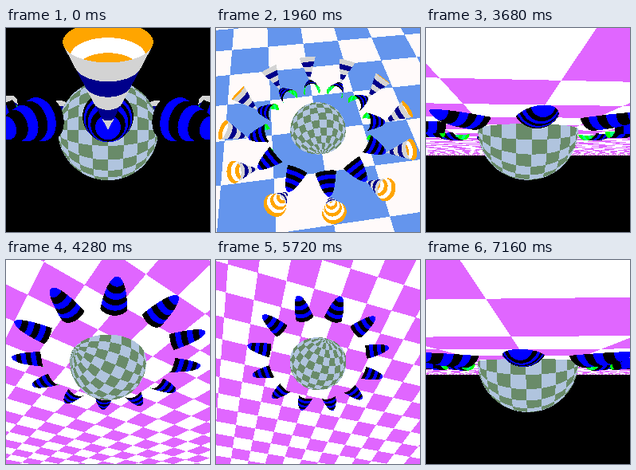
Write an HTML page with a canvas that moves like this. It is 256 px wide and 256 px high and loops after 7.2 s.

```html
<!DOCTYPE html>
<html lang="en">
<head>
<meta charset="utf-8">
<title>Orbit around a checkered sphere</title>
<style>
  html, body { margin: 0; width: 100%; height: 100%; overflow: hidden; background: #000; }
  canvas { display: block; width: 100vw; height: 100vh; image-rendering: pixelated; }
</style>
</head>
<body>
<canvas id="stage" width="256" height="256"></canvas>
<script>
const SIZE = 256, HALF = SIZE / 2, STEPS = 180, STEP_MS = 40;
const FOCAL = HALF / Math.tan(Math.PI / 8);
const ORBIT = 5, LIFT = 7.5;
const RAD = Math.PI / 180;

const ctx = document.getElementById('stage').getContext('2d');
const image = ctx.createImageData(SIZE, SIZE);
const pixels = new Uint32Array(image.data.buffer);
const depth = new Float64Array(SIZE * SIZE);

const rgb = hex => (255 << 24 | (hex & 255) << 16 | (hex >> 8 & 255) << 8 | hex >> 16) >>> 0;
const pair = (a, b) => [rgb(a), rgb(b)];
const skin = (bands, a, b) => ({ bands, colors: pair(a, b) });
const dot = (a, b) => a[0] * b[0] + a[1] * b[1] + a[2] * b[2];

const BLACK = rgb(0x000000);
const FLOOR_TOP = { size: 5 / 3, colors: pair(0x6495ed, 0xfffafa) };
const FLOOR_UNDER = { size: 5 / 6, colors: pair(0xe066ff, 0xffffff) };
const BALL = pair(0x698b69, 0xb0c4de);

// Surface of revolution: radius² = a k² + b k for 0 <= k <= length along its axis.
const CONE = { length: 0.95, radius: 0.333, a: (0.333 / 0.95) ** 2, b: 0, tilt: 45,
  outside: skin(5, 0xd3d3d3, 0x00008b), inside: skin(8, 0xffa500, 0xffffff) };
const CUP = { length: 0.75, radius: 0.333, a: 0, b: 0.333 ** 2 / 0.75, tilt: 167,
  outside: skin(6, 0x000000, 0x0000ff), inside: skin(8, 0x00ff00, 0x00ff7f) };

const solids = [];
for (let i = 0; i < 12; i++) {
  const s = Math.sin(i * 30 * RAD), c = Math.cos(i * 30 * RAD);
  for (const kind of [CONE, CUP]) {
    const flat = Math.cos(kind.tilt * RAD), rise = Math.sin(kind.tilt * RAD);
    const axis = [s * flat, rise, c * flat];
    const apex = [2.5 * s, 0, 2.5 * c];
    const middle = apex.map((v, j) => v + axis[j] * kind.length / 2);
    solids.push({ kind, axis, apex, middle, reach: Math.hypot(kind.length / 2, kind.radius) });
  }
}

function cameraAt(angle) {
  const s = Math.sin(angle), c = Math.cos(angle);
  const eye = [-ORBIT * s, LIFT * s, ORBIT * c];
  const far = Math.hypot(...eye);
  const fwd = eye.map(v => -v / far);
  const right = [c, 0, s];
  const up = [-s * fwd[1], ORBIT / far, c * fwd[1]];
  return { eye, fwd, right, up };
}

function rayAt(cam, x, y) {
  const u = (x + 0.5 - HALF) / FOCAL, v = (HALF - y - 0.5) / FOCAL;
  return cam.fwd.map((f, i) => f + u * cam.right[i] + v * cam.up[i]);
}

function put(i, t, color) {
  if (t > 1e-6 && t < depth[i]) { depth[i] = t; pixels[i] = color; }
}

function drawFloor(i, eye, d) {
  const t = -eye[1] / d[1];
  const { size, colors } = eye[1] > 0 ? FLOOR_TOP : FLOOR_UNDER;
  const x = Math.floor((eye[0] + t * d[0]) / size), z = Math.floor((eye[2] + t * d[2]) / size);
  put(i, t, colors[x + z & 1]);
}

function drawBall(i, eye, d) {
  const a = dot(d, d), b = dot(eye, d), disc = b * b - a * (dot(eye, eye) - 1);
  if (disc < 0) return;
  const t = (-b - Math.sqrt(disc)) / a;
  const [x, y, z] = eye.map((e, j) => e + t * d[j]);
  const cell = 15 * RAD;
  const row = Math.floor(Math.atan2(y, z) / cell), col = Math.floor(Math.asin(x) / cell);
  put(i, t, BALL[row + col & 1]);
}

function drawSolid(cam, { kind, axis, apex, middle, reach }) {
  const rel = middle.map((v, j) => v - cam.eye[j]);
  const away = dot(rel, cam.fwd), scale = FOCAL / away;
  const px = HALF + dot(rel, cam.right) * scale, py = HALF - dot(rel, cam.up) * scale;
  const r = reach * FOCAL / (away - reach) * 1.25 + 2;
  const x0 = Math.max(0, Math.floor(px - r)), x1 = Math.min(SIZE - 1, Math.ceil(px + r));
  const y0 = Math.max(0, Math.floor(py - r)), y1 = Math.min(SIZE - 1, Math.ceil(py + r));

  const o = cam.eye.map((v, j) => v - apex[j]);
  const { a, b, length } = kind;
  const ok = dot(o, axis), C = dot(o, o) - ok * ok * (1 + a) - b * ok;
  for (let y = y0; y <= y1; y++) for (let x = x0; x <= x1; x++) {
    const d = rayAt(cam, x, y), dk = dot(d, axis);
    const A = dot(d, d) - dk * dk * (1 + a);
    const B = dot(o, d) - ok * dk * (1 + a) - b * dk / 2;
    const disc = B * B - A * C;
    if (disc < 0) continue;
    const root = Math.sqrt(disc);
    for (const sign of [-1, 1]) {
      const t = (-B + sign * root) / A, k = ok + t * dk;
      if (k < 0 || k > length) continue;
      // The slope of the surface function along the ray tells entry from exit.
      const { bands, colors } = sign < 0 ? kind.outside : kind.inside;
      const band = Math.min(bands - 1, Math.floor((1 - k / length) * bands));
      put(y * SIZE + x, t, colors[band & 1]);
    }
  }
}

function draw(step) {
  const cam = cameraAt(step * 360 / STEPS * RAD);
  pixels.fill(BLACK);
  depth.fill(1e9);
  for (let i = 0; i < SIZE * SIZE; i++) {
    const d = rayAt(cam, i % SIZE, i >> 8);
    if (step % (STEPS / 2)) drawFloor(i, cam.eye, d);
    drawBall(i, cam.eye, d);
  }
  for (const solid of solids) drawSolid(cam, solid);
  ctx.putImageData(image, 0, 0);
}

let shown = -1;
const start = performance.now();
function tick() {
  const step = Math.floor((performance.now() - start) / STEP_MS) % STEPS;
  if (step !== shown) draw(shown = step);
  requestAnimationFrame(tick);
}
tick();
</script>
</body>
</html>
```
